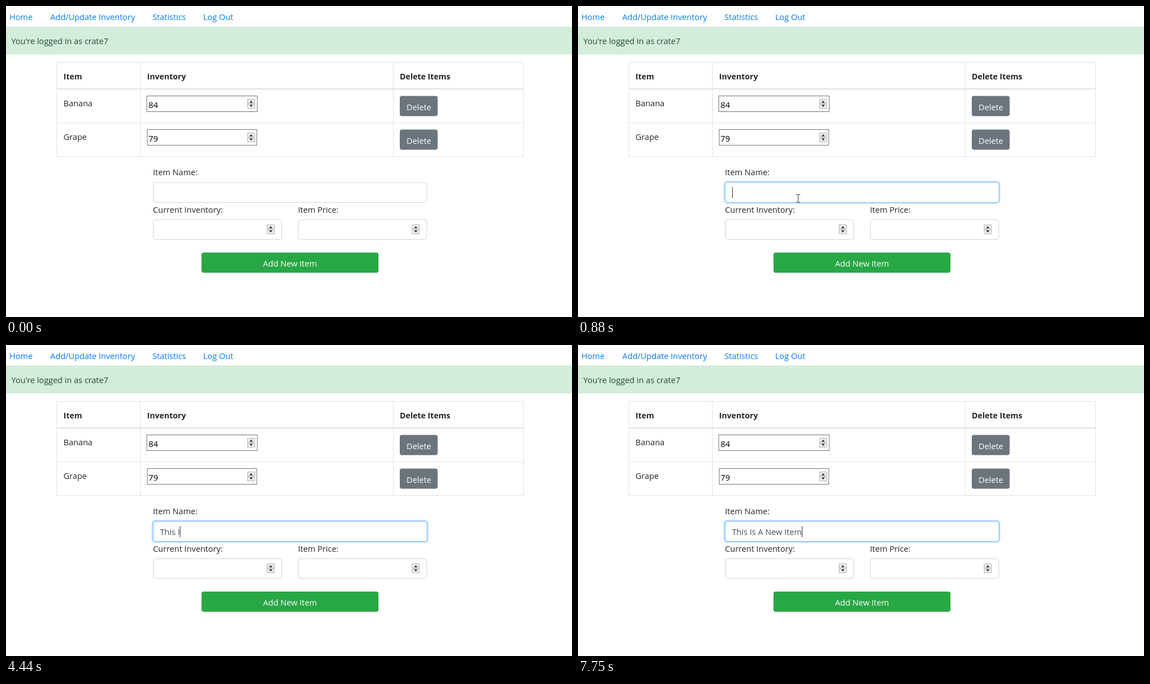
These frames come from a looping animation (1009x555 px, 8000 ms). An HTML page:

```html
<!DOCTYPE html>
<html lang="en">
<head>
<meta charset="utf-8">
<title>Inventory form</title>
<style>
  html, body { margin: 0; width: 100%; height: 100%; overflow: hidden; background: #fff; }
  svg { display: block; }
  text { font: 14.6px "Open Sans", "Noto Sans", sans-serif; fill: #212529; white-space: pre; }
  .nav text { fill: #007bff; }
  .head text { font-weight: 700; font-size: 14.2px; }
  .button text { fill: #fff; }
  .grid { fill: none; stroke: #dee2e6; }
  .number { fill: #fff; stroke: #707070; }
  .number + text { font-size: 15px; fill: #000; }
  .field { fill: #fff; stroke: #ced4da; }
  #typed { fill: #495057; }
</style>
</head>
<body>
<svg width="1009" height="555" viewBox="0 0 1009 555">
  <defs>
    <g id="spinner">
      <path d="M.5 .5h13v7.5h-13zM.5 9h13v7.5h-13z" fill="#ececec" stroke="#b4b4b4"/>
      <path d="M4 6.5h6L7 3zM4 10.5h6L7 14z" fill="#222"/>
    </g>
    <g id="delete" class="button">
      <rect width="67.5" height="36" rx="4" fill="#6c757d"/>
      <text x="12" y="25.5">Delete</text>
    </g>
    <g id="amount">
      <rect class="field" x=".5" y=".5" width="229" height="35" rx="4"/>
      <use href="#spinner" x="203" y="9"/>
    </g>
  </defs>

  <g class="nav">
    <text x="6" y="25">Home</text>
    <text x="79" y="25">Add/Update Inventory</text>
    <text x="261" y="25">Statistics</text>
    <text x="351.5" y="25">Log Out</text>
  </g>

  <rect x="-2" y="37.5" width="1013" height="48" fill="#d4edda" stroke="#c3e6cb"/>
  <text x="9.5" y="68" style="fill:#1f4a38">You're logged in as crate7</text>

  <path class="grid" d="M90.5 100.5h832v168h-832zM239.5 100v168M690.5 100v168M90 208.5h832"/>
  <path class="grid" d="M90 148h833" stroke-width="2"/>
  <g class="head">
    <text x="102.5" y="131">Item</text>
    <text x="251.5" y="131">Inventory</text>
    <text x="702" y="131">Delete Items</text>
  </g>

  <text x="102.5" y="179">Banana</text>
  <rect class="number" x="251" y="160.5" width="197" height="28"/>
  <text x="254" y="182">84</text>
  <use href="#spinner" x="430" y="166"/>
  <use href="#delete" x="702" y="160.5"/>

  <text x="102.5" y="239">Grape</text>
  <rect class="number" x="252" y="220.5" width="195" height="28"/>
  <text x="254" y="242">79</text>
  <use href="#spinner" x="430" y="226"/>
  <use href="#delete" x="702" y="220.5"/>

  <text x="262" y="302">Item Name:</text>
  <text x="262" y="369">Current Inventory:</text>
  <text x="520.5" y="369">Item Price:</text>
  <use href="#amount" x="262" y="381"/>
  <use href="#amount" x="520.5" y="381"/>
  <g class="button">
    <rect x="348.5" y="440" width="315.5" height="36" rx="4" fill="#28a745"/>
    <text x="506.3" y="465" text-anchor="middle">Add New Item</text>
  </g>

  <rect class="field" x="262.5" y="315" width="488" height="35.5" rx="4"/>
  <g id="focus">
    <rect x="260.75" y="313.25" width="491" height="38.5" rx="5.5" fill="none" stroke="#bfdeff" stroke-width="2.5"/>
    <rect x="262.5" y="315" width="488" height="35.5" rx="4" fill="#fff" stroke="#80bdff"/>
  </g>
  <text id="typed" x="274.5" y="339"></text>
  <path id="caret" d="M.5 323v20" stroke="#333"/>

  <g id="pointer">
    <circle id="click" cx="-2" cy="-1" r="11" fill="#ffff80"/>
    <path id="beam" d="M-4-6.5h3l.5 .5 .5-.5h3M-.5-6V7M-4 7.5h3l.5-.5 .5 .5h3" fill="none" stroke="#333"/>
    <path id="arrow" d="M.5 .5v15l3.5-3.3 2.3 5.3 2.4-1-2.3-5.1h4.6z" fill="#fff" stroke="#222"/>
  </g>
</svg>

<script>
const LOOP = 8000;
const FOCUS = 760;
const BLINK = 531, BLINK_START = 742;

// Bursts of typing: start, pause between keys, keys
const keys = [
  [2760, 100, "Th"], [3080, 110, "is"], [4060, 250, " I"], [4940, 300, "\bI"],
  [5440, 190, "s "], [6190, 250, "A N"], [6940, 125, "ew "], [7370, 126, "Item"]
].flatMap(([start, gap, text]) => [...text].map((key, i) => ({ time: start + i * gap, key })));

const el = id => document.getElementById(id);
const show = (id, on) => el(id).style.display = on ? "" : "none";
const mix = (a, b, u) => a + (b - a) * u;
const progress = (t, from, to) => Math.min(1, Math.max(0, (t - from) / (to - from)));
const ease = u => u * u * (3 - 2 * u);

const entry = [741, 441], bend = [300, 70], field = [388, 339], rest = [417, 360], exit = [664, 488];

function pointerAt(t) {
  const arrive = ease(progress(t, 90, 520));
  const leave = ease(progress(t, 830, 1020));
  const quit = progress(t, 1890, 1905);
  return [0, 1].map(i => {
    const curve = mix(mix(entry[i], bend[i], arrive), mix(bend[i], field[i], arrive), arrive);
    return Math.round(curve + (rest[i] - field[i]) * leave + (exit[i] - rest[i]) * quit);
  });
}

function drawPointer(t) {
  const [x, y] = pointerAt(t);
  const within = (left, top, right, bottom) => x > left && x < right && y > top && y < bottom;
  const beam = within(262, 314, 751, 351) || within(251, 220, 428, 249);
  el("pointer").setAttribute("transform", `translate(${x} ${y})`);
  show("pointer", t >= 90 && t < 1950);
  show("beam", beam);
  show("arrow", !beam);
  show("click", t >= 700 && t < 880);
}

function drawField(t) {
  const pressed = keys.filter(k => k.time <= t);
  const value = pressed.reduce((s, { key }) => key === "\b" ? s.slice(0, -1) : s + key, "");
  const typed = el("typed");
  typed.textContent = value;
  const width = value ? typed.getComputedTextLength() : 0;
  el("caret").setAttribute("transform", `translate(${Math.round(274.5 + width)})`);

  // A key shows the caret; each tick of the steady blink timer toggles it
  const tick = time => Math.floor((time - BLINK_START) / BLINK);
  const shownAt = pressed.length ? pressed.at(-1).time : FOCUS;
  show("caret", t >= FOCUS && (tick(t) - tick(shownAt)) % 2 === 0);
  el("focus").style.opacity = progress(t, FOCUS - 15, FOCUS + 135);
}

function frame(now) {
  const t = now % LOOP;
  drawPointer(t);
  drawField(t);
  requestAnimationFrame(frame);
}
frame(0);
</script>
</body>
</html>
```
